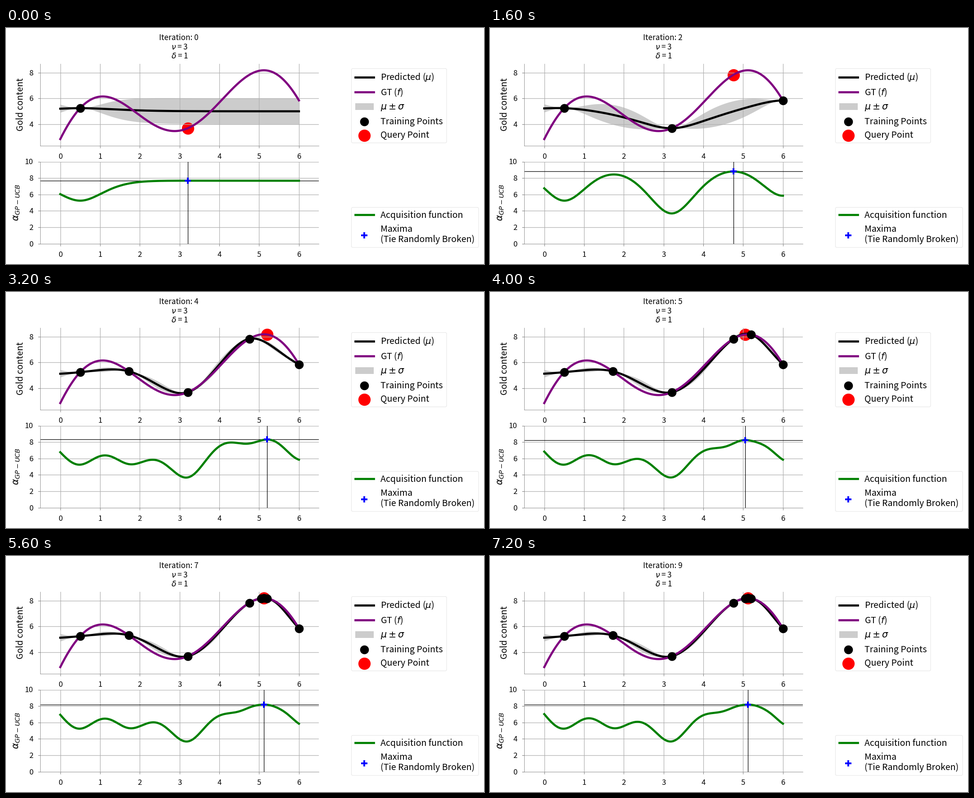
These frames come from a looping animation (1062x527 px, 8000 ms). A matplotlib script:

```python
import numpy as np
import matplotlib.pyplot as plt
from matplotlib.animation import FuncAnimation
from matplotlib.patches import FancyBboxPatch, Polygon, Rectangle

W, H, DPI = 1062, 527, 100
STEPS, STEP_MS = 10, 800
NU, DELTA = 3, 1
PRIOR_MEAN = 5
FIRST_QUERY = 3.205  # random pick on the first plateau
LINE = 3.4
GREY_FILL = "#cccccc"
BIG, TITLE, SMALL = 14.1, 12.3, 12.0
MATH = 14.9

plt.rcParams["font.family"] = "Noto Sans CJK JP"
plt.rcParams["mathtext.fontset"] = "dejavusans"

grid_x = np.linspace(0, 6, 1001)


def truth(x):
    u = x - 3
    return 2 * u * np.sin(u) + 0.5 * u + 3.5


def matern(a, b):
    r = np.sqrt(5) * np.abs(a[:, None] - b[None, :])
    return (1 + r + r**2 / 3) * np.exp(-r)


def posterior(train):
    """Mean and variance on the grid, given the sampled places."""
    k = matern(train, train) + 1e-9 * np.eye(len(train))
    ks = matern(train, grid_x)
    sol = np.linalg.solve(k, ks)
    mean = PRIOR_MEAN + sol.T @ (truth(train) - PRIOR_MEAN)
    var = np.clip(1 - np.sum(ks * sol, axis=0), 0, None)
    return mean, var


def ucb(mean, var, t):
    beta = 2 * np.log(t**2.5 * np.pi**2 / (3 * DELTA))
    return mean + np.sqrt(NU * beta) * var


def run():
    steps, train = [], np.array([0.5])
    for t in range(1, STEPS + 1):
        mean, var = posterior(train)
        acq = ucb(mean, var, t)
        best = grid_x[np.argmax(acq)] if t > 1 else FIRST_QUERY
        steps.append((train, mean, var, acq, best))
        train = np.append(train, best)
    return steps


steps = run()

fig = plt.figure(figsize=(W / DPI, H / DPI), dpi=DPI, facecolor="white")

# Full-stage layer in pixels, y pointing down
page = fig.add_axes([0, 0, 1, 1], zorder=0)
page.set(xlim=(0, W), ylim=(H, 0))
page.axis("off")


def plot_axes(left, top, right, bottom, ylim, yticks):
    ax = fig.add_axes([left / W, 1 - bottom / H, (right - left) / W, (bottom - top) / H],
                      zorder=1)
    ax.patch.set_visible(False)
    ax.set(xlim=(-0.5, 6.5), ylim=ylim, xticks=range(7), yticks=yticks)
    for side in ("top", "right"):
        ax.spines[side].set_visible(False)
    for side in ("left", "bottom"):
        ax.spines[side].set(color="gray", linewidth=0.6)
    ax.tick_params(color="gray", length=3.5, width=0.8,
                   labelleft=False, labelbottom=False)
    ax.set_axisbelow("line")
    ax.grid(True, color="#b0b0b0", linewidth=0.9)
    for x in range(7):
        px = left + (x + 0.5) / 7 * (right - left)
        page.text(px, bottom + 29.5, str(x), size=SMALL, ha="center", va="baseline")
    for y in yticks:
        py = bottom - (y - ylim[0]) / (ylim[1] - ylim[0]) * (bottom - top)
        page.text(60.5, py + 6, str(y), size=SMALL, ha="right", va="baseline")
    return ax


gt = truth(grid_x)
top = plot_axes(76.4, 80, 695, 262.5, (gt.min() - 0.5, gt.max() + 0.5), (4, 6, 8))
low = plot_axes(76.4, 298.5, 695, 481.5, (0, 10), (0, 2, 4, 6, 8, 10))

band = top.add_patch(Polygon([(0, 0), (1, 1)], color=GREY_FILL, lw=0, zorder=1))
query = top.scatter([], [], s=385, color="red", lw=0, zorder=1.1)
pred, = top.plot([], [], color="black", lw=LINE)
top.plot(grid_x, gt, color="purple", lw=LINE)
points = top.scatter([], [], s=200, color="black", lw=0, zorder=10)

hline = low.axhline(0, color="black", lw=0.9, zorder=1.9)
vline = low.axvline(0, color="black", lw=0.9, zorder=1.9)
acq_line, = low.plot([], [], color="green", lw=LINE)
peak = low.scatter([], [], s=90, marker="P", color="blue", lw=0, zorder=10)

title = page.text(340, 27, "", size=TITLE, va="baseline")
page.text(386, 48, rf"$\nu$ = {NU}", size=TITLE, ha="center", va="baseline")
page.text(386, 68.5, rf"$\delta$ = {DELTA}", size=TITLE, ha="center", va="baseline")
page.text(32, 171, "Gold content", size=BIG, rotation=90, ha="center", va="center")
page.text(23.5, 390, r"$\alpha_{GP-UCB}$", size=MATH, rotation=90,
          ha="center", va="center")


def legend_box(x0, y0, x1, y1):
    page.add_patch(FancyBboxPatch((x0 + 3, y0 + 3), x1 - x0 - 6, y1 - y0 - 6,
                                  boxstyle="round,pad=3,rounding_size=3",
                                  fc="white", ec="#e6e6e6", lw=0.8))


def legend_line(y, color):
    page.plot([775.5, 816.5], [y, y], color=color, lw=LINE)


def legend_text(y, text, size=BIG):
    page.text(832.5, y, text, size=size, va="baseline")


legend_box(767.5, 90.5, 979, 256.5)
legend_line(109.5, "black")
legend_line(143, "purple")
page.add_patch(Rectangle((775.5, 168), 41.5, 15, color=GREY_FILL, lw=0))
page.scatter([795.5], [209], s=200, color="black", lw=0)
page.scatter([795.5], [239.5], s=385, color="red", lw=0)
legend_text(116.5, r"Predicted ($\mu$)")
legend_text(149.8, r"GT ($f$)")
legend_text(182.5, r"$\mu \pm \sigma$", MATH)
legend_text(214.8, "Training Points")
legend_text(245, "Query Point")

legend_box(767.5, 400.5, 1050, 490)
legend_line(417, "green")
page.scatter([795.5], [463], s=90, marker="P", color="blue", lw=0)
legend_text(424, "Acquisition function")
legend_text(455, "Maxima")
legend_text(478, "(Tie Randomly Broken)")


def draw(i):
    train, mean, var, acq, best = steps[i]
    level = np.interp(best, grid_x, acq)
    title.set_text(f"Iteration: {i}")
    band.set_xy(np.column_stack([np.r_[grid_x, grid_x[::-1]],
                                 np.r_[mean + var, (mean - var)[::-1]]]))
    pred.set_data(grid_x, mean)
    points.set_offsets(np.column_stack([train, truth(train)]))
    query.set_offsets([[best, truth(best)]])
    acq_line.set_data(grid_x, acq)
    hline.set_ydata([level, level])
    vline.set_xdata([best, best])
    peak.set_offsets([[best, level]])
    return title, band, pred, points, query, acq_line, hline, vline, peak


anim = FuncAnimation(fig, draw, frames=STEPS, interval=STEP_MS,
                     repeat=True, repeat_delay=0, blit=False)
plt.show()
```
